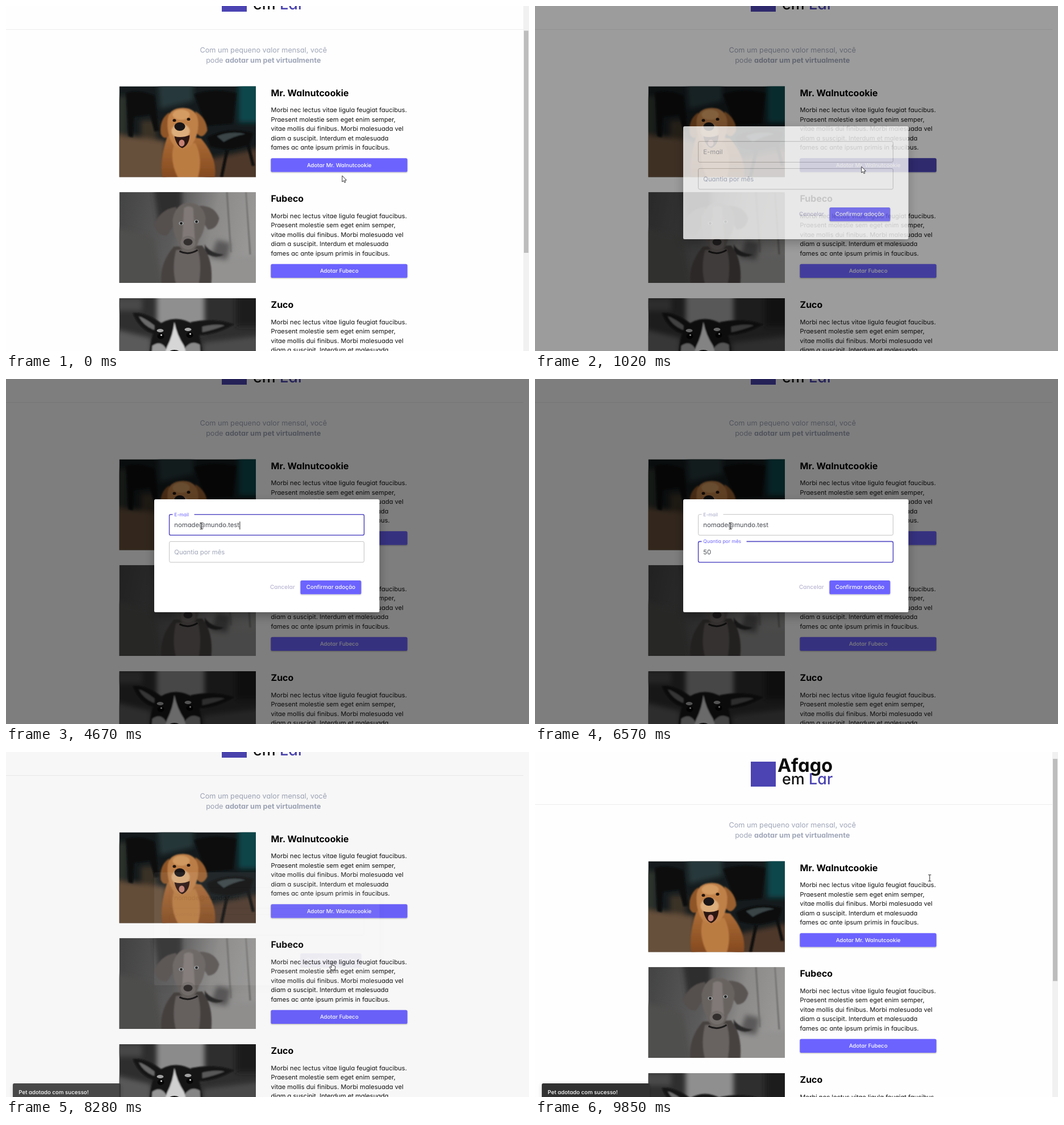
Animation of 921x608 px, one loop 9920 ms. Source, as an HTML page:

```html
<!DOCTYPE html>
<html lang="pt-BR">
<head>
<meta charset="utf-8">
<title>Afago em Lar</title>
<style>
  html, body { margin: 0; width: 100%; height: 100%; overflow: hidden; background: #fefefe; }
  svg { display: block; width: 921px; height: 608px; }
  svg svg { width: auto; height: auto; }
  text { font-family: Inter, "Open Sans", sans-serif; font-feature-settings: "cv11"; text-rendering: geometricPrecision; white-space: pre; }
</style>
</head>
<body>
<svg id="stage" viewBox="0 0 921 608" xmlns="http://www.w3.org/2000/svg"></svg>
<script>
const LOOP = 9920;
const OPEN = 908, FOCUS = 1520, TAB = 4870, PRESS = 8060, CLOSE = 8143;
const EMAIL = 'nomade@mundo.test';
const PURPLE = '#6c63ff', DEEP = '#4b44b2', MUTED = '#9fa6b8';

// ---------- markup helpers ----------
const rect = (x, y, w, h, fill, extra = '') =>
  `<rect x="${x}" y="${y}" width="${w}" height="${h}" fill="${fill}" ${extra}/>`;
const path = (d, fill, extra = '') => `<path d="${d}" fill="${fill}" ${extra}/>`;
const oval = (x, y, rx, ry, fill, extra = '') =>
  `<ellipse cx="${x}" cy="${y}" rx="${rx}" ry="${ry}" fill="${fill}" ${extra}/>`;
const text = (x, y, str, size, fill, weight = 400, extra = '') =>
  `<text x="${x}" y="${y}" font-size="${size}" fill="${fill}" font-weight="${weight}" ${extra}>${str}</text>`;
const group = (id, body, extra = '') => `<g id="${id}" ${extra}>${body}</g>`;
const soft = (size, body) => `<g filter="url(#soft${size})">${body}</g>`;
const MID = 'text-anchor="middle"';

// ---------- photos (240.5 x 160) ----------
const goldenDog = () =>
  rect(0, 0, 241, 160, '#151b1d') +
  soft(4, path('M-10 84 L82 96 V170 H-10Z', '#66503a') + path('M150 130 L250 108 V170 H150Z', '#4d3929') +
    rect(210, -10, 40, 74, '#0d474b') + path('M68 -5 H130 V26 L72 40Z', '#27373a') +
    path('M-5 18 H14 V84 H-5Z', '#2c3029') + path('M38 60 H66 V92 H38Z', '#3a3128')) +
  soft(1, path('M12 12 Q30 4 62 16 L70 78 L62 80 L54 50 L26 54 L24 90 L16 88Z', '#080d0f') +
    path('M132 14 Q165 2 206 12 L200 66 L152 70Z', '#080d0f') +
    path('M154 90 Q190 70 236 82 L230 102 Q196 118 160 106Z', '#0b1011') +
    path('M172 88 Q196 78 222 84 Q200 88 184 98Z', '#3b4547') +
    path('M190 112 L180 160 M226 100 L236 140', 'none', 'stroke="#080a0b" stroke-width="5"')) +
  soft(1, path('M86 84 Q70 130 76 162 H168 Q174 126 144 92Z', 'url(#fur)') +
    path('M96 104 Q88 132 104 162 H138 Q148 128 134 100Z', '#bb7b42') +
    path('M88 46 Q70 58 73 84 Q80 98 90 84Z', '#8f5528') +
    path('M134 44 Q154 56 155 78 Q146 96 136 82Z', '#9a5f2f') +
    path('M85 62 Q86 38 112 38 Q136 38 139 62 Q140 92 124 106 Q109 114 96 104 Q84 88 85 62Z', '#c0814a') +
    oval(109, 50, 15, 9, '#d49c64') + oval(108, 79, 16, 13, '#dcae7c')) +
  oval(97, 60, 3, 2.6, '#22150d') + oval(122, 58, 3, 2.6, '#22150d') +
  path('M97 88 Q109 92 124 86 Q123 104 111 109 Q101 106 97 88Z', '#2b1612') +
  oval(110, 100, 5, 6, '#c58274') + oval(106.5, 71, 9.5, 7.5, '#191516');

const greyDog = () =>
  rect(0, 0, 241, 160, 'url(#wall)') +
  soft(4, path('M-10 62 L60 80 L78 170 H-10Z', '#504f4e') + path('M155 118 L250 112 V170 H150Z', '#939291') +
    path('M60 -10 H110 V30 L70 60Z', '#2f2f2f') + path('M172 84 L196 90 L190 120 L160 116Z', '#5a5958')) +
  soft(1, path('M188 0 H191 L198 106 H195Z M222 0 H224 L232 110 H229Z', '#6f6e6d') +
    path('M150 92 Q160 108 184 110 Q170 118 152 108Z', '#2c2a2a') +
    path('M96 96 Q70 126 74 162 H162 Q166 118 146 94Z', '#464241') +
    path('M100 102 Q92 134 100 162 H140 Q146 126 138 100Z', '#676260') +
    path('M100 26 Q72 30 61 58 Q68 78 84 76 Q96 60 104 44Z', '#544f4d') +
    path('M142 24 Q168 24 176 46 Q172 66 156 66 Q148 52 138 40Z', '#5a5553') +
    path('M94 48 Q100 18 124 19 Q148 20 152 46 Q150 72 140 84 Q136 104 121 104 Q106 104 103 86 Q94 72 94 48Z', '#696361') +
    path('M114 28 Q122 22 130 28 L133 84 H111Z', '#807977')) +
  oval(121, 89, 13, 12, '#746e6c') + oval(121, 88, 8, 6, '#332f2f') +
  oval(109, 55, 4, 3, '#a5abad') + oval(136, 52, 4, 3, '#a5abad') +
  oval(109, 55, 2.4, 2.4, '#1c1b1b') + oval(136, 52, 2.4, 2.4, '#1c1b1b') +
  path('M106 104 Q122 112 138 102', 'none', 'stroke="#1d1b1b" stroke-width="3"');

const blackDog = () =>
  rect(0, 0, 241, 160, '#2f2f2f') +
  soft(4, rect(66, -10, 84, 70, '#8f8f8f') + rect(-10, 0, 50, 22, '#4a4a4a') +
    path('M-10 54 L56 70 V170 H-10Z', '#5a5a5a') + path('M148 78 L250 66 V170 H148Z', '#4c4c4c') +
    rect(206, -10, 50, 60, '#1c1c1c')) +
  soft(1, path('M74 44 Q46 24 24 26 Q36 58 66 64Z', '#121212') + path('M62 48 Q44 34 34 32 Q44 50 62 56Z', '#6a6a6a') +
    path('M126 42 Q166 34 202 46 Q172 64 138 66Z', '#121212') + path('M146 50 Q170 44 186 48 Q166 56 146 60Z', '#5a5a5a') +
    path('M54 160 Q48 84 64 50 Q98 24 134 48 Q152 84 146 160Z', '#171717') +
    path('M58 84 Q74 72 84 92 L76 160 H54Z', '#9a9a9a') + path('M142 82 Q126 72 114 90 L122 160 H146Z', '#8a8a8a') +
    path('M97 42 Q101 64 114 84 Q126 120 116 160 H78 Q72 120 84 86 Q95 64 97 42Z', '#d6d6d6')) +
  oval(72, 57, 6, 3, '#a5a5a5') + oval(121, 55, 6, 3, '#a5a5a5') +
  oval(73, 67, 6, 5, '#050505') + oval(124, 65, 6, 5, '#050505') +
  oval(74, 65, 1.6, 1.4, '#ddd') + oval(125, 63, 1.6, 1.4, '#ddd') + oval(97, 100, 13, 9, '#111');

// ---------- page ----------
const LOREM = ['Morbi nec lectus vitae ligula feugiat faucibus.', 'Praesent molestie sem eget enim semper,',
  'vitae mollis dui finibus. Morbi malesuada vel', 'diam a suscipit. Interdum et malesuada',
  'fames ac ante ipsum primis in faucibus.'];

const button = (x, y, w, fill, extra = '') => rect(x, y, w, 24.3, fill, `rx="2.6" ${extra}`);

const card = (name, photo, y, hoverId = '') =>
  `<svg x="199.5" y="${y}" width="240.5" height="160" style="width:240.5px;height:160px">${photo}</svg>` +
  text(466.5, y + 17, name, 16, '#000', 700) +
  LOREM.map((line, i) => text(466.5, y + 45.6 + 16.5 * i, line, 11.1, '#111')).join('') +
  button(466.4, y + 126.7, 240.4, PURPLE, 'filter="url(#lift)"') +
  (hoverId && button(466.4, y + 126.7, 240.4, DEEP, `id="${hoverId}"`)) +
  text(586.8, y + 142.2, 'Adotar ' + name, 9.6, '#fff', 500, MID);

const page =
  rect(380, -34, 44, 44, DEEP) +
  text(427, -16, 'Afago', 32.5, '#0b0b0b', 700) +
  text(435, 6, `em <tspan fill="${DEEP}">Lar</tspan>`, 27, '#111', 500) +
  rect(0, 41.2, 911, .8, '#e9e9e9') +
  text(453.3, 82, 'Com um pequeno valor mensal, você', 12.7, MUTED, 400, MID) +
  text(453.3, 100, 'pode <tspan font-weight="700">adotar um pet virtualmente</tspan>', 12.6, MUTED, 400, MID) +
  card('Mr. Walnutcookie', goldenDog(), 141.5, 'adoptHover') +
  card('Fubeco', greyDog(), 328.1) +
  card('Zuco', blackDog(), 515);

// ---------- dialog ----------
const field = (id, y) =>
  rect(287.6, y, 343, 36.6, 'none', `id="${id}Box" rx="2.5"`) +
  rect(293.5, y - 2, 0, 4, '#fff', `id="${id}Notch"`) +
  `<text id="${id}Label" font-size="11.3"></text>` +
  `<text id="${id}Value" x="296.3" y="${y + 22.7}" font-size="11.3" fill="#484b52"></text>` +
  rect(0, y + 12.5, 1, 14, '#222', `id="${id}Caret"`);

const tooltip = path('M359.5 283 H369 L373.5 278 L378 283 H649.5 V312.5 H359.5Z', '#7a7a7a') +
  `<g clip-path="url(#tooltipClip)">` +
  text(367, 301, 'https://images.pexels.com/photos/1436517/pexels-photo-143657.jpeg?auto', 8.6, '#fff', 400,
    'style="font-family:\'Open Sans\',sans-serif"') + '</g>';

const dialog =
  rect(261, 212, 396.5, 199, '#fff', 'rx="2.5" filter="url(#deep)"') +
  field('email', 238.7) + field('amount', 286.4) +
  text(465, 370.3, 'Cancelar', 10, '#b8b5d2', 500) +
  button(518.5, 355, 107, PURPLE, 'filter="url(#lift)"') +
  button(518.5, 355, 107, DEEP, 'id="confirmHover" filter="url(#lift)"') +
  `<circle id="ripple" cx="572" cy="369" fill="#fff" clip-path="url(#confirmClip)"/>` +
  text(572, 370.4, 'Confirmar adoção', 9.9, '#fff', 500, MID) +
  group('tooltip', tooltip);

const arrow = path('M0 0 V11 L2.5 8.7 L4.2 12.3 L6 11.5 L4.4 8 H7.6Z', '#fff', 'stroke="#222" stroke-width=".9"');
const hand = path('M-1 1 Q0 -.6 1 1 V5 L5 6 Q6.2 6.4 6 8 L5.2 13 H-1.2 L-4.2 8.6 Q-4 7 -2.6 7.6 L-1 9Z',
  '#fff', 'stroke="#222" stroke-width=".9"');
const beam = path('M-2.5 -5.5 H-.7 L0 -5 L.7 -5.5 H2.5 M0 -5 V5 M-2.5 5.5 H-.7 L0 5 L.7 5.5 H2.5', 'none',
  'stroke="#333" stroke-width="1.1"');

const shadow = (id, dy, blur, opacity) =>
  `<filter id="${id}" x="-10%" y="-20%" width="120%" height="160%"><feDropShadow dx="0" dy="${dy}" stdDeviation="${blur}" flood-opacity="${opacity}"/></filter>`;
const blur = size => `<filter id="soft${size}"><feGaussianBlur stdDeviation="${size}"/></filter>`;

document.getElementById('stage').innerHTML = `<defs>
  <linearGradient id="wall" x2="1" y2=".15"><stop stop-color="#434343"/><stop offset=".45" stop-color="#5c5b5b"/><stop offset=".72" stop-color="#8b8a89"/><stop offset="1" stop-color="#989796"/></linearGradient>
  <linearGradient id="fur" x2="0" y2="1"><stop stop-color="#b06f38"/><stop offset="1" stop-color="#83491f"/></linearGradient>
  ${shadow('lift', 1, .8, .3)}${shadow('deep', 7, 9, .3)}${shadow('low', 2, 3, .2)}${blur(1)}${blur(4)}
  <clipPath id="tooltipClip">${rect(364, 283, 284, 30, '#fff')}</clipPath>
  <clipPath id="confirmClip">${button(518.5, 355, 107, '#fff')}</clipPath></defs>` +
  rect(0, 0, 921, 608, '#fefefe') + group('page', page) +
  group('scrollbar', rect(911, 0, 10, 608, '#f1f1f1') + rect(912, 43.5, 8, 391.5, '#bdbdbd', 'id="thumb"')) +
  rect(0, 0, 921, 608, '#000', 'id="backdrop"') + group('dialog', dialog) +
  group('toast', rect(12, 584, 190, 40, '#323232', 'rx="2.5" filter="url(#low)"') +
    text(22.3, 602.8, 'Pet adotado com sucesso!', 9.7, '#fff', 500)) +
  group('arrow', arrow) + group('hand', hand) + group('beam', beam);

// ---------- timing ----------
const el = {};
document.querySelectorAll('[id]').forEach(node => el[node.id] = node);
const set = (id, attrs) => { for (const k in attrs) el[id].setAttribute(k, attrs[k]); };
const ramp = (t, start, span) => Math.min(1, Math.max(0, (t - start) / span));
const between = (t, a, b) => t >= a && t < b;

// cubic-bezier(.4, 0, .2, 1)
function ease(x) {
  let lo = 0, hi = 1;
  for (let i = 0; i < 18; i++) {
    const s = (lo + hi) / 2, r = 1 - s;
    if (1.2 * r * r * s + .6 * r * s * s + s ** 3 < x) lo = s; else hi = s;
  }
  return lo * lo * (3 - 2 * lo);
}
const tween = (t, start, span) => ease(ramp(t, start, span));

const KEYS = [1700, 2320, 2320, 2320, 2460, 2590, 2720, 3140, 3470, 3580, 3690, 3800, 4000, 4200, 4270, 4470, 4670];
const MOUSE = [[0, 592, 299], [420, 588, 282], [880, 586, 282], [1020, 575, 283], [1480, 344, 259], [6570, 344, 259],
  [7150, 676, 388], [7700, 574, 371], [8600, 574, 371], [9500, 695, 222], [LOOP, 695, 222]];
const SCROLL = [[9650, 12], [9750, 35], [9850, 51]];

function mouseAt(t) {
  const i = Math.max(1, MOUSE.findIndex(m => m[0] > t));
  const [t0, x0, y0] = MOUSE[i - 1], [t1, x1, y1] = MOUSE[i];
  const p = ramp(t, t0, t1 - t0), s = p * p * (3 - 2 * p);
  return [x0 + (x1 - x0) * s, y0 + (y1 - y0) * s];
}

function pointerKind(t, x, y) {
  if (t < OPEN) return y < 292.5 ? 'hand' : 'arrow';
  if (t < CLOSE) {
    if (x > 518 && x < 626 && y > 355 && y < 380) return 'hand';
    const inField = x > 287 && x < 631 && (between(y, 238, 275.5) || between(y, 286, 323));
    return inField ? 'beam' : 'arrow';
  }
  return t < 8600 ? 'hand' : 'beam';
}

function drawField(id, label, y, notch, shrink, focused, value, caretOn) {
  set(id + 'Box', { stroke: focused ? '#5a51c6' : '#c2c2c2', 'stroke-width': focused ? 1.6 : 1 });
  set(id + 'Notch', { width: notch * shrink });
  set(id + 'Label', {
    transform: `translate(296.3 ${y + 22.2 - 19.4 * shrink}) scale(${1 - .25 * shrink})`,
    fill: focused ? PURPLE : shrink ? '#a3a6c6' : MUTED
  });
  el[id + 'Label'].textContent = label;
  el[id + 'Value'].textContent = value;
  const width = value ? el[id + 'Value'].getComputedTextLength() : 0;
  set(id + 'Caret', { x: 296.6 + width, opacity: focused && caretOn ? 1 : 0 });
}

function render(t) {
  const scroll = SCROLL.reduce((y, [at, value]) => t >= at ? value : y, 0);
  set('page', { transform: `translate(0 ${scroll})` });
  set('thumb', { y: 43.5 - scroll * .615 });
  set('scrollbar', { opacity: between(t, OPEN, CLOSE + 200) ? 0 : 1 });

  const shown = t < CLOSE ? tween(t, OPEN, 225) : 1 - tween(t, CLOSE, 195);
  set('backdrop', { opacity: shown / 2 });
  set('dialog', { opacity: shown });
  set('toast', { opacity: tween(t, CLOSE, 225) });

  const [x, y] = mouseAt(t), kind = pointerKind(t, x, y);
  for (const k of ['arrow', 'hand', 'beam'])
    set(k, { transform: `translate(${x} ${y})`, opacity: k === kind ? 1 : 0 });

  set('adoptHover', { opacity: tween(t, 180, 250) - tween(t, 1050, 250) });
  set('confirmHover', { opacity: tween(t, 7420, 220) });
  const wave = ramp(t, PRESS, 400);
  set('ripple', { r: 8 + wave * 20, opacity: t >= PRESS ? .16 * (1 - wave) : 0 });
  set('tooltip', { opacity: ramp(t, 1540, 60) * (1 - ramp(t, 1640, 95)) });

  const pause = between(t, 2870, 3140) || between(t, 3330, 3470);
  drawField('email', 'E-mail', 238.7, 38, tween(t, FOCUS, 160), between(t, FOCUS, TAB),
    EMAIL.slice(0, KEYS.filter(at => t >= at).length), !pause);
  const amount = t >= PRESS ? '' : t >= 6040 ? '50' : t >= 5690 ? '5' : '';
  drawField('amount', 'Quantia por mês', 286.4, 79, tween(t, TAB, 200), between(t, TAB, PRESS),
    amount, t < 6570 || Math.floor((t - 6570) / 530) % 2 === 1);
}

const begin = performance.now();
function frame() {
  render((performance.now() - begin) % LOOP);
  requestAnimationFrame(frame);
}
frame();
</script>
</body>
</html>
```
